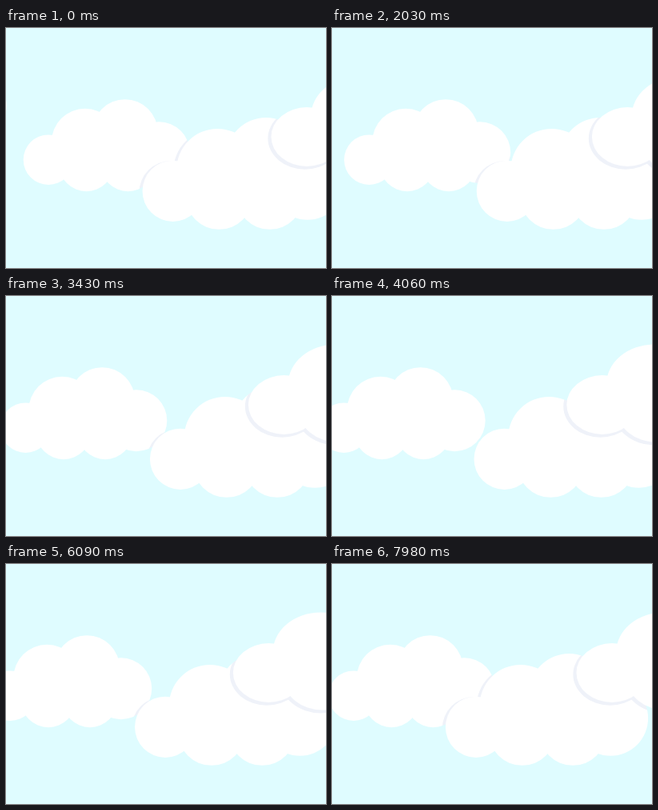
An HTML page with a canvas for the animation above (8 s loop, 400 px wide and 300 px high).

```html
<!DOCTYPE html>
<html lang="en">
<head>
<meta charset="utf-8">
<title>Drifting clouds</title>
<style>
  html, body { margin: 0; width: 100%; height: 100%; overflow: hidden; background: #dffcff; }
  canvas { display: block; width: 400px; height: 300px; }
</style>
</head>
<body>
<canvas id="sky" width="400" height="300"></canvas>
<script>
const ctx = document.getElementById('sky').getContext('2d');
const LOOP = 8000, STEP = 70, DRIFT = 50;
const WHITE = '#fff', SHADE = '#eff2f9';

// One cloud shape serves all: a crown of four puffs over two equal base puffs.
const puff = (x, y, r) => ({ x, y, r });
const crown = [puff(0, 0, 31.3), puff(45.8, -22, 42), puff(95.7, -34.5, 41), puff(138.3, -9, 38.5)];
const base = [47.5, 99.5].map(x => puff(x, 5, 34.5));
const puffs = [...crown, ...base];

// peak: time at the rightmost position; half: duration of one sweep.
const quick = { peak: 630, half: 5000 };
const slow = { peak: 2550, half: 8000 };

// From back to front; x and y place the leftmost puff at its peak.
const clouds = [
  { x: -174.5, y: 106, sx: 1, sy: 1, motion: quick },
  { x: 54.6, y: 164.7, sx: 1, sy: 1, motion: quick },
  { x: 219.2, y: 203.8, sx: 1.217, sy: 1.217, motion: slow },
  { x: 377.5, y: 136, sx: 1.42, sy: 1.18, motion: quick }
];

// cubic-bezier(.42, 0, .58, 1)
function easeInOut(x) {
  let u = x;
  for (let i = 0; i < 6; i++) {
    const v = 1 - u;
    const error = 1.26 * u * v * v + 1.74 * u * u * v + u * u * u - x;
    const slope = 1.26 * v * v + 0.96 * u * v + 1.26 * u * u;
    u -= error / slope;
  }
  return u * u * (3 - 2 * u);
}

function driftAt({ peak, half }, time) {
  const sweep = Math.abs(time - peak) / half % 2;
  return -DRIFT * easeInOut(sweep < 1 ? sweep : 2 - sweep);
}

function fillCloud({ x, y, sx, sy }, dx, dy, grow, color) {
  const left = x + dx, top = y + dy;
  ctx.fillStyle = color;
  ctx.beginPath();
  for (const p of puffs) {
    const cx = left + p.x * sx, cy = top + p.y * sy;
    const rx = p.r * sx + grow, ry = p.r * sy + grow;
    ctx.moveTo(cx + rx, cy);
    ctx.ellipse(cx, cy, rx, ry, 0, 0, 2 * Math.PI);
  }
  ctx.rect(left, top - 15 * sy, 138 * sx, 37 * sy);
  ctx.fill();
}

function draw(time) {
  ctx.clearRect(0, 0, 400, 300);
  for (const cloud of clouds) {
    const dx = driftAt(cloud.motion, time);
    // Shadows fall only on the clouds behind, never on the sky.
    ctx.globalCompositeOperation = 'source-atop';
    fillCloud(cloud, dx - 2.3, 2, 1.8, SHADE);
    ctx.globalCompositeOperation = 'source-over';
    fillCloud(cloud, dx, 0, 0, WHITE);
  }
}

const start = performance.now();
function tick() {
  const time = (performance.now() - start) % LOOP;
  draw(Math.floor(time / STEP) * STEP);
  requestAnimationFrame(tick);
}
tick();
</script>
</body>
</html>
```
